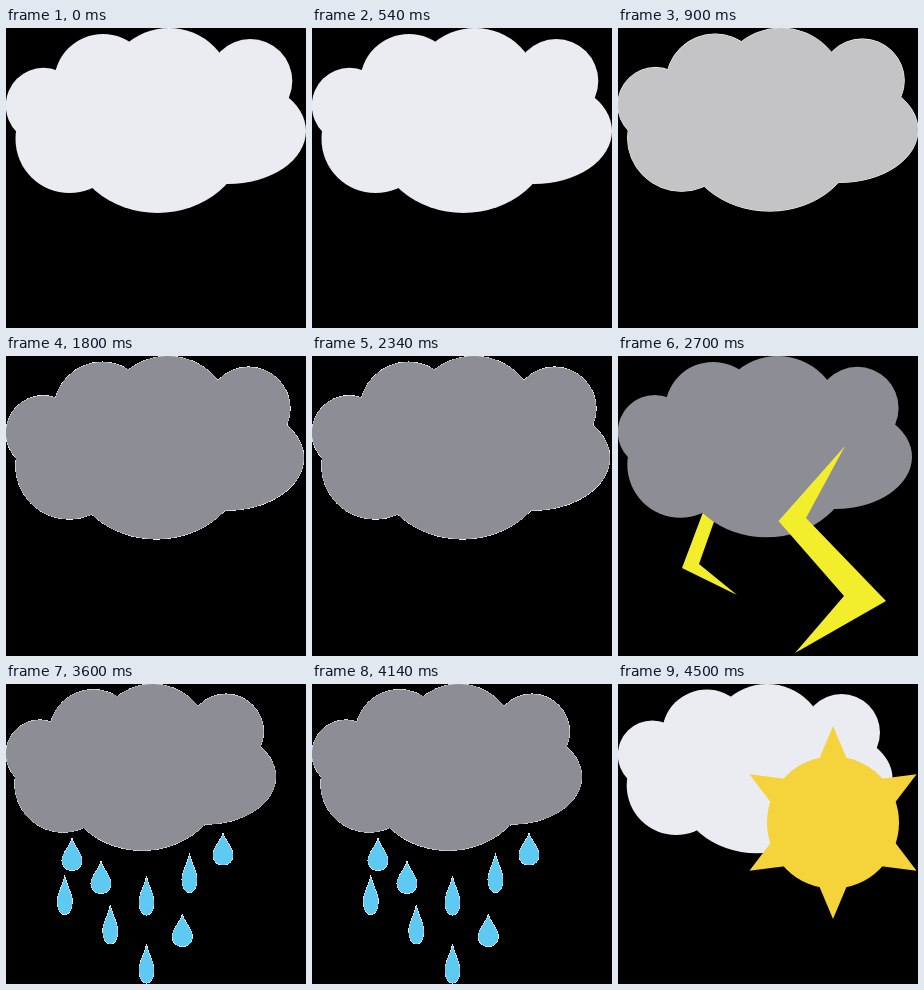
An HTML page that plays this animation: 300x300 px, repeating every 5400 ms.

```html
<!DOCTYPE html>
<html lang="en">
<head>
<meta charset="utf-8">
<title>Weather</title>
<style>
  html, body { margin: 0; width: 100%; height: 100%; overflow: hidden; background: #000; }
  svg { display: block; width: 100vw; height: 100vh; }
  .scene {
    visibility: hidden;
    animation: show 5.4s step-end infinite;
    animation-delay: calc(var(--i) * .9s - 5.4s);
  }
  @keyframes show {
    0% { visibility: visible; }
    16.6667%, 100% { visibility: hidden; }
  }
  .light { fill: #ebecf2; }
  .mid { fill: #c4c4c6; }
  .dark { fill: #8d8d96; }
  .bolt { fill: #f3ee2b; }
  .rain { fill: #5fcaf1; }
  .sun { fill: #f4d43a; }
  /* hard white edge under a smooth fill */
  .rim { fill: #fff; stroke: #fff; stroke-width: 1; shape-rendering: crispEdges; }
</style>
</head>
<body>
<svg viewBox="0 0 300 300">
  <defs>
    <g id="cloud">
      <circle cx="37.5" cy="77.5" r="37.7"/>
      <circle cx="97" cy="55" r="49"/>
      <circle cx="163" cy="64" r="64"/>
      <circle cx="244.3" cy="53" r="42"/>
      <ellipse cx="222" cy="103" rx="78" ry="53"/>
      <circle cx="63.5" cy="111" r="54"/>
      <ellipse cx="151.5" cy="110" rx="87.5" ry="75"/>
    </g>
    <path id="fat" d="M0 0C2 8 10 14 10 22C10 28 6 32 0 32S-10 28 -10 22C-10 14 -2 8 0 0Z"/>
    <path id="thin" d="M0 0C1.5 10 7.5 17 7.5 26C7.5 34 4.5 39 0 39S-7.5 34 -7.5 26C-7.5 17 -1.5 10 0 0Z"/>
    <path id="ray" d="M0 -96.5L14.5 -62H-14.5Z"/>
    <g id="drops">
      <use href="#fat" x="66" y="154.5"/>
      <use href="#fat" x="95" y="177.5"/>
      <use href="#fat" x="217" y="149"/>
      <use href="#fat" x="176.3" y="230.5"/>
      <use href="#thin" x="58.8" y="191.5"/>
      <use href="#thin" x="104.3" y="221"/>
      <use href="#thin" x="140.5" y="192"/>
      <use href="#thin" x="140.5" y="260"/>
      <use href="#thin" x="183.5" y="169.5"/>
    </g>
  </defs>

  <g class="scene" style="--i:0"><use href="#cloud" class="light"/></g>

  <g class="scene" style="--i:1">
    <g transform="scale(1 .99)">
      <use href="#cloud" class="rim"/>
      <use href="#cloud" class="mid"/>
    </g>
  </g>

  <g class="scene" style="--i:2">
    <g transform="scale(.993 .99)">
      <use href="#cloud" class="rim"/>
      <use href="#cloud" class="dark"/>
    </g>
  </g>

  <g class="scene" style="--i:3">
    <path class="bolt" d="M90 143L64 212L119 239L81 208L103 146Z"/>
    <use href="#cloud" class="dark" transform="scale(.98)"/>
    <path class="bolt" d="M227 90L160.5 165L226 240L177 297L268 245L188 162Z"/>
  </g>

  <g class="scene" style="--i:4">
    <g transform="scale(.9)">
      <use href="#cloud" class="rim"/>
      <use href="#cloud" class="dark"/>
    </g>
    <use href="#drops" class="rim"/>
    <use href="#drops" class="rain"/>
  </g>

  <g class="scene" style="--i:5">
    <use href="#cloud" class="light" transform="scale(.915)"/>
    <g class="sun" transform="translate(215 138.5)">
      <circle r="66"/>
      <use href="#ray"/>
      <use href="#ray" transform="rotate(60)"/>
      <use href="#ray" transform="rotate(120)"/>
      <use href="#ray" transform="rotate(180)"/>
      <use href="#ray" transform="rotate(240)"/>
      <use href="#ray" transform="rotate(300)"/>
    </g>
  </g>
</svg>
</body>
</html>
```
